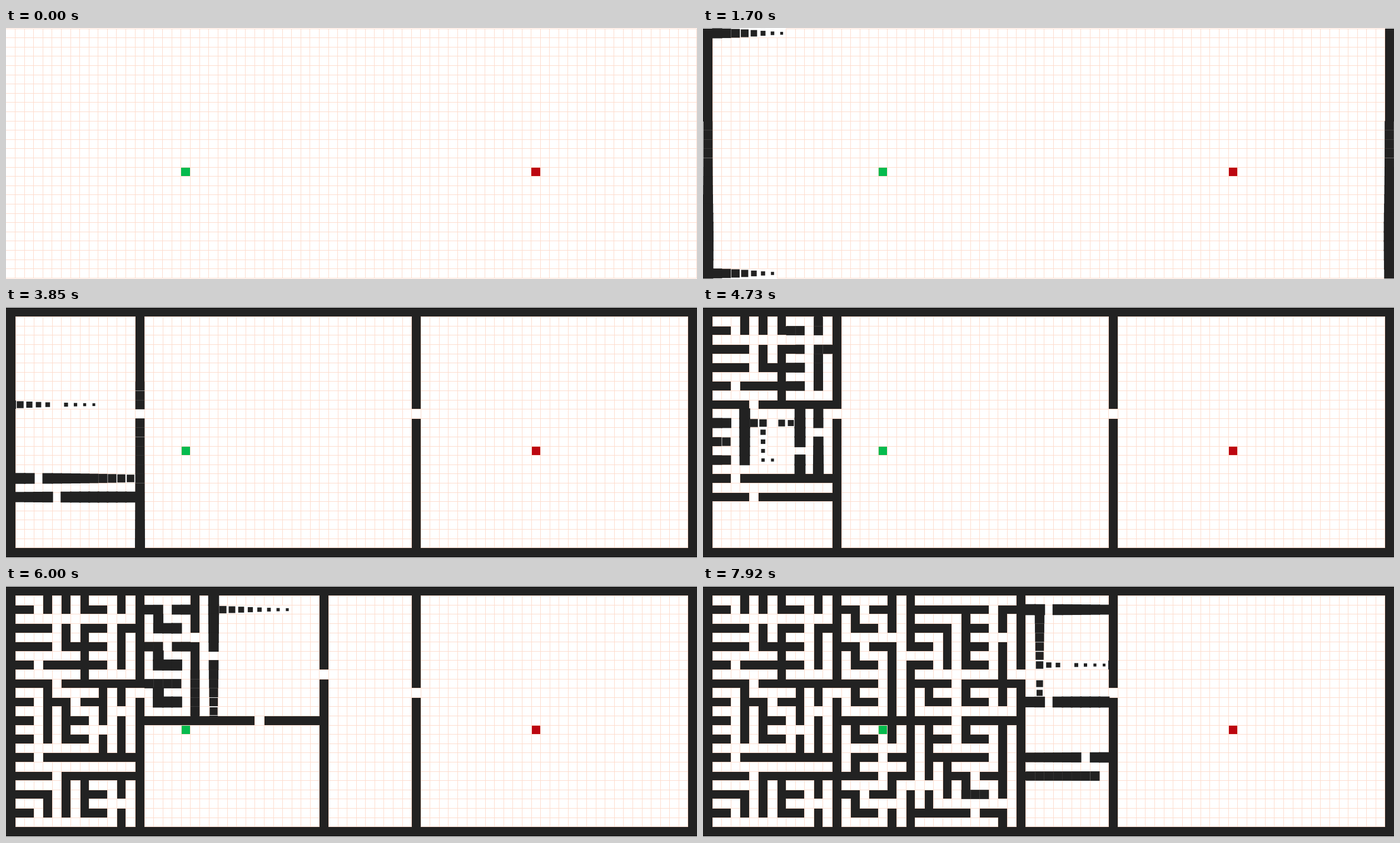
These frames come from a looping animation (1243 by 451 pixels, 8 s). An HTML page with a canvas:

```html
<!DOCTYPE html>
<html lang="en">
<head>
<meta charset="utf-8">
<title>Recursive division maze</title>
<style>
  html, body { margin: 0; width: 100%; height: 100%; overflow: hidden; background: #fff; }
  canvas { display: block; }
</style>
</head>
<body>
<canvas id="stage" width="1243" height="451"></canvas>
<script>
const ctx = document.getElementById('stage').getContext('2d');
const WIDTH = 1243, HEIGHT = 451;
const COLS = 75, ROWS = 27, CELL_W = WIDTH / COLS, CELL_H = 16.6, TOP = 1;
const LOOP = 8000, FIRST_TICK = 1060, LAST_TICK = 7920, TICK = (LAST_TICK - FIRST_TICK) / 86;
const WALL_START = 997.5, WALL_GAP = 10.225, GROW = 500;
const COLORS = { line: '#fddccd', wall: '#222', start: '#05bb4e', goal: '#bc0610' };

// Cuts of the wide rooms in depth-first order: positive is a column, negative a row.
// The opening is at the far end unless a second value places it.
const keyCuts = [
  [44, 11], [14, 11],
  [-20, 5], [-18, 3], [-10, 5], [8, 3], [-8, 3], [-6, 5], [6, 3], -4, [-4, 11], 12,
  [12, 13], [10, 15], 4, [-12, 7], 6, [12, 23], 6, -22, 8,
  [34, 9], [-14, 27], [20, 5], -10, [-6, 17], [-2, 17],
  [22, 7], [-2, 31], [-10, 27], [32, 5], 28, -4, 26,
  [22, 21], [-20, 19], [16, 17], [-18, 19], [20, 23], [-22, 17],
  [32, 23], [-24, 29], [24, 21], -18, 26, [-20, 29],
  -20, [-18, 41], [-12, 37], [-2, 37], [36, 9], [-8, 39]
];

const walls = [];
const addWall = (col, row) => walls.push({ col, row });

function addBorder() {
  for (let row = 0; row < ROWS; row++) {
    addWall(0, row);
    addWall(COLS - 1, row);
  }
  for (let col = 1; col < COLS - 1; col++) {
    addWall(col, 0);
    addWall(col, ROWS - 1);
  }
}

// A strip is cut across its long side, at the first multiple of four that fits.
function stripCut(left, right, top, bottom) {
  const pick = (from, to) => {
    const fourth = Math.ceil((from + 1) / 4) * 4;
    return fourth < to ? fourth : from + 1;
  };
  return right - left > bottom - top ? pick(left, right) : -pick(top, bottom);
}

function divide(left, right, top, bottom) {
  const thickness = Math.min(right - left, bottom - top) + 1;
  if (thickness < 3) return;
  const cut = thickness === 3 ? stripCut(left, right, top, bottom) : keyCuts.shift();
  if (!cut) return;
  const [signed, opening] = [cut].flat();
  const at = Math.abs(signed);
  if (signed > 0) {
    const gap = opening ?? bottom;
    for (let row = top; row <= bottom; row++) if (row !== gap) addWall(at, row);
    divide(left, at - 1, top, bottom);
    divide(at + 1, right, top, bottom);
  } else {
    const gap = opening ?? right;
    for (let col = left; col <= right; col++) if (col !== gap) addWall(col, at);
    divide(left, right, top, at - 1);
    divide(left, right, at + 1, bottom);
  }
}

addBorder();
divide(1, COLS - 2, 1, ROWS - 2);

// cubic-bezier(.25, .1, .25, 1)
function ease(x) {
  const curve = (a, b, u) => 3 * a * u * (1 - u) ** 2 + 3 * b * u * u * (1 - u) + u ** 3;
  let low = 0, high = 1;
  for (let i = 0; i < 18; i++) {
    const mid = (low + high) / 2;
    if (curve(.25, .25, mid) < x) low = mid; else high = mid;
  }
  return curve(.1, 1, low);
}

function wallScale(age) {
  const p = age / GROW;
  return p < .5 ? .3 + .9 * ease(p * 2) : 1.2 - .2 * ease(p * 2 - 1);
}

function draw(time) {
  // The collapsed table border moves the columns slightly once the left wall exists.
  const shift = time >= WALL_START ? .45 : 0;
  const lineX = col => Math.min(WIDTH - 1, Math.floor(col * CELL_W + shift));
  const lineY = row => Math.floor(row * CELL_H + TOP);
  const cellBox = (col, row) => {
    const x = lineX(col), y = lineY(row);
    return { x, y, w: lineX(col + 1) - x, h: lineY(row + 1) - y };
  };

  const ages = walls.map((_, i) => time - WALL_START - i * WALL_GAP);
  const shown = walls.filter((_, i) => ages[i] >= 0);
  const blocked = new Set(shown.map(w => w.row * COLS + w.col));

  ctx.fillStyle = '#fff';
  ctx.fillRect(0, 0, WIDTH, HEIGHT);

  ctx.fillStyle = COLORS.wall;
  shown.forEach(({ col, row }, i) => {
    if (ages[i] < GROW) return;
    const { x, y, w, h } = cellBox(col, row);
    ctx.fillRect(x, y, w + 1, h + 1);
  });

  ctx.fillStyle = COLORS.line;
  for (let row = 0; row < ROWS; row++) {
    for (let col = 0; col < COLS; col++) {
      if (blocked.has(row * COLS + col)) continue;
      const { x, y, w, h } = cellBox(col, row);
      ctx.fillRect(x, y, w + 1, 1);
      ctx.fillRect(x, y + h, w + 1, 1);
      if (col) ctx.fillRect(x, y, 1, h + 1);
      ctx.fillRect(x + w, y, 1, h + 1);
    }
  }

  const marker = (col, row, color) => {
    const { x, y, w, h } = cellBox(col, row);
    ctx.fillStyle = color;
    ctx.fillRect(x + 1, y + 1, w - 1, h - 1);
  };
  marker(19, 15, COLORS.start);
  marker(57, 15, COLORS.goal);

  ctx.fillStyle = COLORS.wall;
  shown.forEach(({ col, row }, i) => {
    if (ages[i] >= GROW) return;
    const { x, y, w, h } = cellBox(col, row);
    const scale = wallScale(ages[i]), sw = CELL_W * scale, sh = CELL_H * scale;
    ctx.fillRect(x + (w + 1 - sw) / 2, y + (h + 1 - sh) / 2, sw, sh);
  });
}

// The picture advances in steps of about 80 ms.
function tickTime(t) {
  const step = Math.floor((t - FIRST_TICK + 8) / TICK);
  return step < 0 ? 0 : Math.min(LAST_TICK, FIRST_TICK + step * TICK);
}

let begin, drawn;
function frame(now) {
  begin ??= now;
  const time = tickTime((now - begin) % LOOP);
  if (time !== drawn) draw(drawn = time);
  requestAnimationFrame(frame);
}
draw(0);
requestAnimationFrame(frame);
</script>
</body>
</html>
```
